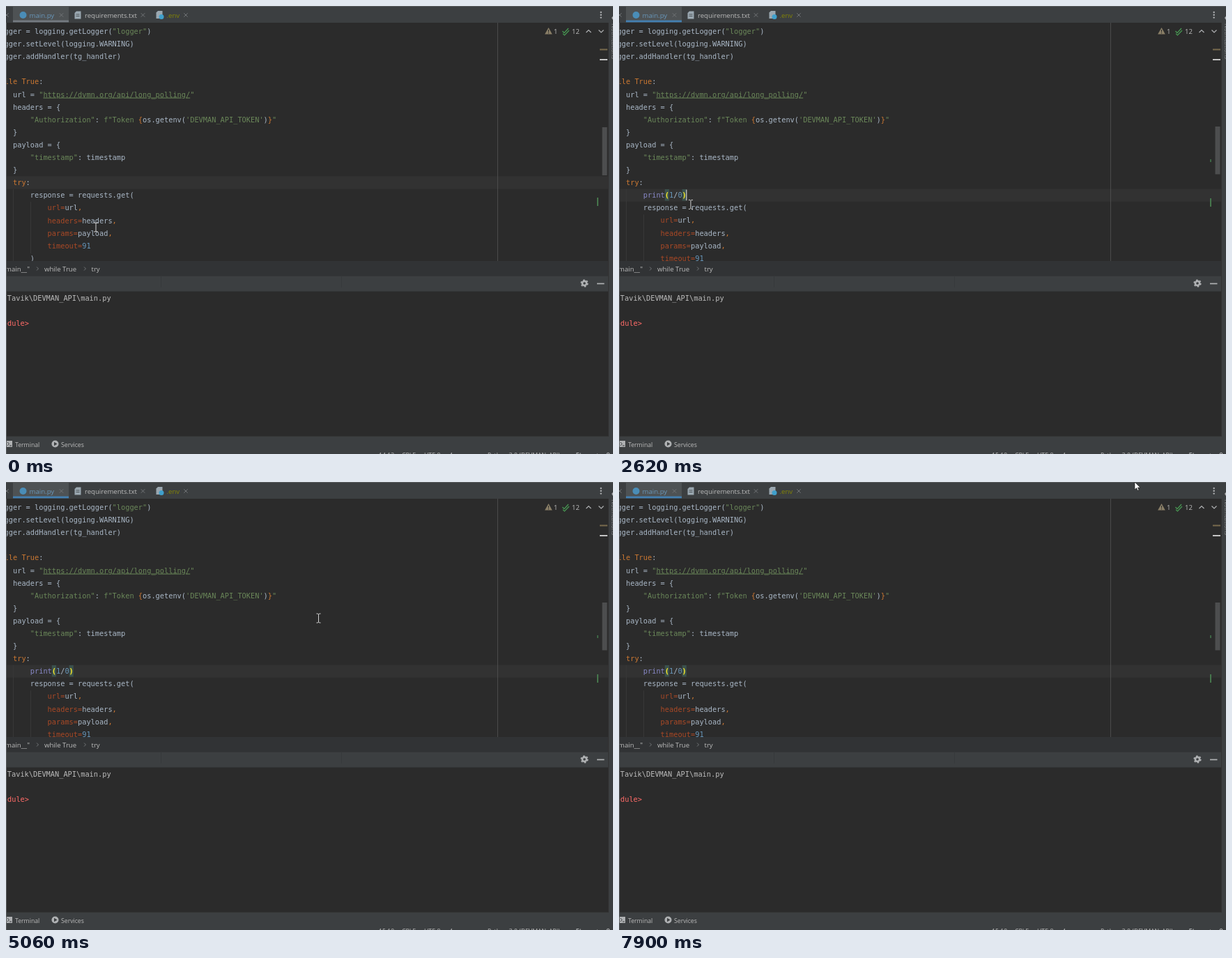
An HTML page for the animation above (8000 ms loop, 871 by 643 pixels).

```html
<!DOCTYPE html>
<html lang="en">
<head>
<meta charset="utf-8">
<title>Editor session</title>
<style>
  html, body { margin: 0; width: 100%; height: 100%; overflow: hidden; background: #2b2b2b; }
  svg { display: block; width: 871px; height: 643px; }
  text { font: 9.6px "Open Sans", "Noto Sans", sans-serif; fill: #bbbbbb; }
  .mono text { font: 10.3px "DejaVu Sans Mono", monospace; fill: #a9b7c6; }
  .mono .kw { fill: #cc7832; }
  .mono .str { fill: #6a8759; }
  .mono .arg { fill: #aa4926; }
  .mono .num { fill: #6897bb; }
  .mono .fn { fill: #8888c6; }
  .mono .err { fill: #ff6b68; }
  .mono .match { fill: #ffef28; font-weight: bold; }
  .link { text-decoration: underline; }
  .small text { font-size: 8.7px; }
  .line { fill: none; stroke: #afb1b3; stroke-width: 1.2; }
  .dim { stroke: #717477; stroke-width: 1; }
</style>
</head>
<body>
<svg viewBox="0 0 871 643">
  <defs>
    <clipPath id="page"><rect y="24" width="865" height="342"/></clipPath>
    <path id="close" class="line dim" d="M-2.7-2.7 2.7 2.7M2.7-2.7-2.7 2.7"/>
    <path id="sheet" d="M-2-5.5H4.5V5.5H-4.5V-3Z" fill="#9aa7b0"/>
  </defs>

  <rect width="871" height="643" fill="#2b2b2b"/>

  <g clip-path="url(#page)">
    <rect id="current" width="865" height="18.2" fill="#323232"/>
    <path id="guides" fill="none" stroke="#373737"/>
    <path d="M705.5 24V366" stroke="#4b4b4b"/>
    <g id="code" class="mono"></g>
    <rect id="caret" width="1.2" height="15.5" fill="#d0d0d0"/>
  </g>

  <!-- inspections and scroll marks -->
  <path d="M778.5 31 783.8 40.5H773.2Z" fill="#8a7f67"/>
  <path d="M778.5 34V37.3M778.5 38.2V39.4" stroke="#2b2b2b"/>
  <text x="786" y="40">1</text>
  <path class="line" d="M798.5 36 801 38.7 807 32M799 39.6 801.4 42 808 35" style="stroke:#499c54"/>
  <text x="812" y="40">12</text>
  <path class="line" d="M832.5 38 836 34.5 839.5 38M850.5 34.5 854 38 857.5 34.5"/>
  <path d="M852 62.5H863" stroke="#786a4d" stroke-width="2"/>
  <path d="M852 77H863" stroke="#c4c4c4" stroke-width="2"/>
  <rect id="thumb" x="855.5" width="7" fill="#4d4e4f"/>
  <rect id="change" x="848" width="2" height="12" fill="#46764c"/>
  <rect id="newMark" x="848" y="220" width="2" height="4" fill="#3d6644"/>

  <!-- tabs -->
  <rect width="871" height="24" fill="#3c3f41"/>
  <rect x="10" width="80" height="23" fill="#4e5254"/>
  <rect id="underline" x="10" y="20.5" width="80" height="2.8"/>
  <circle cx="24.5" cy="13" r="5" fill="#4a8db7"/>
  <text x="33.5" y="16.5" style="fill:#6897bb">main.py</text>
  <use href="#sheet" x="103" y="13"/>
  <path d="M100.5 12H105.500M100.500 14.500H105.500" stroke="#4c5357"/>
  <text x="113" y="16.5">requirements.txt</text>
  <use href="#sheet" x="220" y="12.5"/>
  <circle cx="223" cy="15.500" r="3.500" fill="#40a0cc"/>
  <text x="230.5" y="16.5" style="fill:#848504">.env</text>
  <use href="#close" x="1" y="13"/><use href="#close" x="79.500" y="13"/>
  <use href="#close" x="196.500" y="13"/><use href="#close" x="258" y="13"/>
  <g fill="#afb1b3"><circle cx="853.700" cy="9" r="1.200"/><circle cx="853.700" cy="12.800" r="1.200"/><circle cx="853.700" cy="16.600" r="1.200"/></g>

  <!-- right strip -->
  <rect x="864.500" y="24" width="6.500" height="619" fill="#3c3f41"/>
  <path d="M864.500 24V637" stroke="#323232"/>
  <path d="M869 17 871 14.500V20Z" fill="#afb1b3"/>
  <text transform="translate(868.500 25) rotate(90)" style="font-size:8.700px;fill:#8a8c8e">Notifications</text>

  <!-- breadcrumbs -->
  <rect y="366" width="864" height="21" fill="#313335"/>
  <text x="34" y="381" text-anchor="end">if __name__ == "__main__"</text>
  <text x="55" y="381">while True</text>
  <text x="122.500" y="381">try</text>
  <path class="line dim" d="M44 374.500 46.500 377 44 379.500M112 374.500 114.500 377 112 379.500"/>

  <!-- run panel -->
  <rect y="387" width="864" height="22" fill="#3c3f41"/>
  <path d="M0 387.500H864M0 409.500H864" stroke="#343638"/>
  <path d="M222.500 388V404M481.500 388V404" stroke="#36393b"/>
  <circle cx="830" cy="398" r="3.100" fill="none" stroke="#afb1b3" stroke-width="2.600"/>
  <circle cx="830" cy="398" r="4.800" fill="none" stroke="#afb1b3" stroke-width="1.600" stroke-dasharray="2.500 2.527"/>
  <path d="M848 398.500H858.500" stroke="#afb1b3" stroke-width="1.700"/>
  <g class="mono">
    <text x="-4.400" y="423" style="fill:#bbbbbb">\Tavik\DEVMAN_API\main.py</text>
    <text x="33" y="459" text-anchor="end" class="err">in &lt;module&gt;</text>
  </g>

  <!-- bottom bars -->
  <rect y="617" width="871" height="26" fill="#3c3f41"/>
  <path d="M0 617.500H865" stroke="#323232"/>
  <g class="small">
    <rect y="624" width="9" height="9" fill="#afb1b3"/>
    <path d="M2 626 4.500 628.500 2 631M5 631H8" fill="none" stroke="#3c3f41"/>
    <text x="13" y="633">Terminal</text>
    <circle cx="70.500" cy="628.500" r="5" fill="#afb1b3"/>
    <path d="M69 625.800 73.500 628.500 69 631.200Z" fill="#3c3f41"/>
    <text x="79" y="633">Services</text>
    <text id="position" x="535" y="648"></text>
    <text x="568" y="648">CRLF</text><text x="600" y="648">UTF-8</text>
    <text x="636" y="648">4 spaces</text>
    <text x="691" y="648">Python 3.9 (DEVMAN_API)</text>
    <text x="830" y="648">master</text>
    <path class="line" d="M819 643V641.500H822M824 643V641.500M862 643Q864 639.500 866 643"/>
  </g>
  <path d="M0 .5H871M.5 24V643" stroke="#595c5e" fill="none"/>

  <path id="beam" fill="none" stroke="#d2d2d2" d="M0-5.500V5.500M-3-6.500H-1L0-5.500 1-6.500H3M-3 6.500H-1L0 5.500 1 6.500H3"/>
  <path id="arrow" fill="#fff" stroke="#111" stroke-width=".6" d="M0 0V11L2.600 8.600 4.200 12.300 6 11.500 4.400 8H8Z"/>
</svg>

<script>
const LOOP = 8000, CHAR = 6.2, ROW = 18.1, LEFT = -14.8;
const CLICK = 870, ENTER = 1630, TYPED = 2350;
const $ = id => document.getElementById(id);
const set = (id, attrs) => Object.entries(attrs).forEach(([k, v]) => $(id).setAttribute(k, v));
const show = (id, on) => set(id, { visibility: on ? 'visible' : 'hidden' });

const token = name => text => `<tspan class="${name}">${text}</tspan>`;
const [kw, str, arg, num, fn, match] = ['kw', 'str', 'arg', 'num', 'fn', 'match'].map(token);
const column = n => LEFT + n * CHAR;
const row = (n, indent, body) =>
  `<text x="${column(indent)}" y="${40 + n * ROW}">${body}</text>`;
const comma = kw(',');

const head = [
  [0, 0, `logger = logging.getLogger(${str('"logger"')})`],
  [1, 0, 'logger.setLevel(logging.WARNING)'],
  [2, 0, 'logger.addHandler(tg_handler)'],
  [4, 0, kw('while True') + ':'],
  [5, 4, `url = ${str('"')}${token('str link')('https://dvmn.org/api/long_polling/')}${str('"')}`],
  [6, 4, 'headers = {'],
  [7, 8, `${str('"Authorization"')}: ${str('f"Token ')}${kw('{')}os.getenv(${str("'DEVMAN_API_TOKEN'")})${kw('}')}${str('"')}`],
  [8, 4, '}'],
  [9, 4, 'payload = {'],
  [10, 8, `${str('"timestamp"')}: timestamp`],
  [11, 4, '}'],
  [12, 4, kw('try') + ':']
];
const tail = [
  [13, 8, 'response = requests.get('],
  [14, 12, arg('url=') + 'url' + comma],
  [15, 12, arg('headers=') + 'headers' + comma],
  [16, 12, arg('params=') + 'payload' + comma],
  [17, 12, arg('timeout=') + num('91')],
  [18, 8, ')']
];
const rows = list => list.map(r => row(...r)).join('');
$('code').innerHTML = rows(head) + `<g id="tail">${rows(tail)}</g>` +
  `<g id="pair" fill="#3b514d">${[13, 17].map(c =>
    `<rect x="${column(c)}" y="263" width="${CHAR}" height="16.500"/>`).join('')}</g>` +
  row(13, 8, '').replace('<text', '<text id="typed"');

// Time, text on the new line, caret column after the indent
const typing = [
  [ENTER, '', 0],
  [1900, 'pri', 3],
  [2050, fn('print') + '()', 6],
  [2200, `${fn('print')}(${num('1')})`, 7],
  [TYPED, `${fn('print')}${match('(')}${num('1')}/${num('0')}${match(')')}`, 10]
];

// Time, x, y of the pointer
const path = [
  [0, 129, 317.5], [150, 129, 317.5], [300, 122, 305], [600, 91, 264], [750, 83, 254.5],
  [ENTER, 83, 254.5], [1900, 90, 268], [TYPED, 103, 286], [2620, 103, 285], [2770, 90, 267],
  [2920, 79, 290], [3130, 88, 350], [3400, 124, 440], [3580, 132, 460], [3730, 150, 490],
  [4050, 230, 585], [4350, 340, 628], [4600, 450, 600], [4750, 515, 542], [4910, 480, 380],
  [5060, 448.5, 195.5], [5200, 448.5, 195.5], [5450, 570, 110], [5720, 680, 25],
  [5870, 705, 4], [6400, 713.5, -4], [6640, 713.5, -4], [6780, 726, 0],
  [7660, 726, 0], [7780, 735, 0], [7900, 740, 0], [LOOP, 740, 0]
];

function pointerAt(t) {
  const i = path.findIndex(p => p[0] > t);
  const [a, b] = [path[i - 1], path[i]];
  const k = (t - a[0]) / (b[0] - a[0]);
  return [a[1] + (b[1] - a[1]) * k, a[2] + (b[2] - a[2]) * k];
}

function caretOn(t) {
  if (t < CLICK) return false;
  if (t < ENTER) return t < 1330;
  return t < TYPED || Math.floor((t - 2220) / 500) % 2 === 0;
}

let shown;
function draw(t) {
  const inserted = t >= ENTER;
  const step = typing.filter(s => s[0] <= t).pop();
  const shift = inserted ? ROW : 0;
  const text = step ? step[1] : '';
  if (text !== shown) $('typed').innerHTML = shown = text;

  set('tail', { transform: `translate(0 ${shift})` });
  set('guides', { d: `M10.500 263V366M35.500 ${281 + shift}V${Math.min(355 + shift, 366)}` });
  set('current', { y: 244.4 + shift });
  set('underline', { fill: t < CLICK ? '#747a80' : '#437fb0' });
  set('thumb', { y: inserted ? 173 : 174, height: inserted ? 68.5 : 69 });
  set('change', { y: inserted ? 276 : 275 });
  show('newMark', inserted);
  show('pair', t >= TYPED);
  $('position').textContent = !inserted ? '14:13' : `15:${9 + step[2]}`;

  set('caret', { x: step ? column(8 + step[2]) - .6 : 34, y: 245.5 + shift });
  show('caret', caretOn(t));

  const [x, y] = pointerAt(t);
  const overText = (y > 24 && y < 366) || (y > 409 && y < 617);
  const place = { transform: `translate(${x} ${y})` };
  set('beam', place);
  set('arrow', place);
  show('beam', overText);
  show('arrow', !overText);
}

const start = performance.now();
function tick() {
  draw((performance.now() - start) % LOOP);
  requestAnimationFrame(tick);
}
tick();
</script>
</body>
</html>
```
